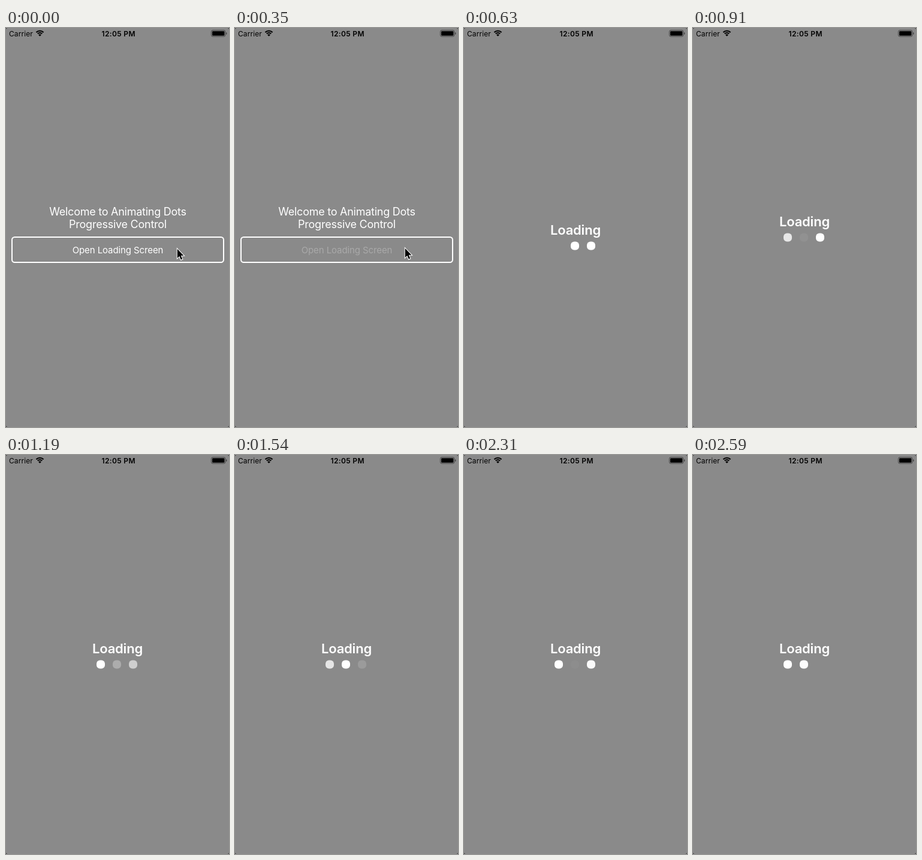
Recreate the animation shown at these times as an HTML page with a canvas. Size 372 by 664 pixels, loop 2.8 s.

```html
<!DOCTYPE html>
<html lang="en">
<head>
<meta charset="utf-8">
<title>Loading dots</title>
<style>
html, body { margin: 0; width: 100%; height: 100%; overflow: hidden; background: #8a8a8a; }
canvas { display: block; width: 372px; height: 664px; }
</style>
</head>
<body>
<canvas id="stage"></canvas>
<script>
const W = 372, H = 664, LOOP = 2800, STEP = 70, LAST = 2590;
const BG = '#8a8a8a';
const canvas = document.getElementById('stage');
const ctx = canvas.getContext('2d');
const dpr = window.devicePixelRatio || 1;
canvas.width = W * dpr;
canvas.height = H * dpr;

const clamp = v => Math.min(1, Math.max(0, v));
const mix = (a, b, u) => a + (b - a) * clamp(u);

// Symmetric cubic-bezier(.42, 0, .58, 1), solved by bisection.
function ease(u) {
  if (u <= 0) return 0;
  if (u >= 1) return 1;
  let lo = 0, hi = 1;
  for (let i = 0; i < 20; i++) {
    const s = (lo + hi) / 2, r = 1 - s;
    if (1.26 * r * r * s + 1.74 * r * s * s + s * s * s < u) lo = s; else hi = s;
  }
  return lo * lo * (3 - 2 * lo);
}

function text(str, x, y, size, weight, spacing = 0, color = '#fff', align = 'center') {
  ctx.font = `${weight} ${size}px Inter, Roboto, sans-serif`;
  ctx.letterSpacing = spacing + 'px';
  ctx.textAlign = align;
  ctx.fillStyle = color;
  ctx.fillText(str, x, y);
}

function box(x, y, w, h, r) {
  ctx.beginPath();
  ctx.roundRect(x, y, w, h, r);
}

function statusBar() {
  text('Carrier', 5, 13.5, 12, 400, 0.1, '#000', 'left');
  text('12:05 PM', 187.7, 13.5, 12, 600, 0.35, '#000');

  // Wi-Fi fan
  ctx.strokeStyle = ctx.fillStyle = '#000';
  ctx.lineWidth = 2;
  for (const r of [8.6, 5.3]) {
    ctx.beginPath();
    ctx.arc(56.5, 13.3, r, -Math.PI * 0.75, -Math.PI * 0.25);
    ctx.stroke();
  }
  ctx.beginPath();
  ctx.moveTo(56.5, 13.8);
  ctx.arc(56.5, 13.8, 3.4, -Math.PI * 0.75, -Math.PI * 0.25);
  ctx.fill();

  // Battery
  ctx.strokeStyle = 'rgba(0,0,0,.5)';
  ctx.lineWidth = 1;
  box(342.5, 3.8, 23.4, 10.4, 2.5);
  ctx.stroke();
  ctx.fillStyle = '#000';
  box(344, 5.3, 20.4, 7.4, 1.3);
  ctx.fill();
  ctx.fillStyle = 'rgba(0,0,0,.5)';
  box(367, 7.2, 1.4, 3.8, [0, 1.4, 1.4, 0]);
  ctx.fill();
}

function pointer(x, y) {
  const pts = [[0, 0], [0, 15.2], [3.5, 12], [6, 17.8], [8.4, 16.8], [5.9, 11], [10.6, 11]];
  ctx.beginPath();
  pts.forEach(([px, py]) => ctx.lineTo(x + px, y + py));
  ctx.closePath();
  ctx.lineJoin = 'miter';
  ctx.lineWidth = 2;
  ctx.strokeStyle = '#fff';
  ctx.stroke();
  ctx.fillStyle = '#000';
  ctx.fill();
}

function welcome(t) {
  text('Welcome to Animating Dots', 186.5, 311.5, 18, 400, -0.25);
  text('Progressive Control', 186.5, 332.5, 18, 400, -0.25);
  ctx.strokeStyle = '#fff';
  ctx.lineWidth = 2;
  box(10, 348, 353, 42, 4.5);
  ctx.stroke();
  ctx.globalAlpha = t < 302 ? mix(1, 0.2, (t - 70) / 140) : 0.27;
  text('Open Loading Screen', 186.5, 374.5, 15, 400, -0.1);
  ctx.globalAlpha = 1;
  if (t < 420) pointer(mix(285.8, 283.8, t / 350), mix(367.8, 366.8, t / 350));
}

// Each change fades one dot out while the one before it returns.
const fades = [330, 664, 1056, 1444, 1860, 2268];
function dotAlpha(i, t) {
  let a = 1;
  fades.forEach((start, n) => {
    if (t < start) return;
    if (n % 3 === i) a = 1 - ease((t - start) / 300);
    else if (n > 0 && (n - 1) % 3 === i) a = ease((t - start) / 360);
  });
  return a;
}

function loading(t) {
  const s = 0.0176 * (t - 302.4);
  if (s < 0) return;
  const dy = Math.round(H * (1 + s) * Math.exp(-s));
  ctx.fillStyle = BG;
  ctx.fillRect(0, dy, W, H - dy);
  text('Loading', 186, 330 + dy, 22, 600, -0.2);
  for (let i = 0; i < 3; i++) {
    ctx.globalAlpha = dotAlpha(i, t);
    ctx.fillStyle = '#fff';
    box(151 + 27 * i, 341.5 + dy, 14, 14, 5.8);
    ctx.fill();
  }
  ctx.globalAlpha = 1;
}

function corners() {
  ctx.beginPath();
  ctx.rect(0, 0, W, H);
  ctx.roundRect(0, 0, W, H, 3);
  ctx.fillStyle = '#333';
  ctx.fill('evenodd');
}

function draw(t) {
  ctx.setTransform(dpr, 0, 0, dpr, 0, 0);
  ctx.fillStyle = BG;
  ctx.fillRect(0, 0, W, H);
  welcome(t);
  loading(t);
  statusBar();
  corners();
}

const origin = performance.now();
function tick() {
  const t = (performance.now() - origin) % LOOP;
  draw(Math.min(LAST, Math.floor(t / STEP) * STEP));
  requestAnimationFrame(tick);
}
tick();
</script>
</body>
</html>
```
